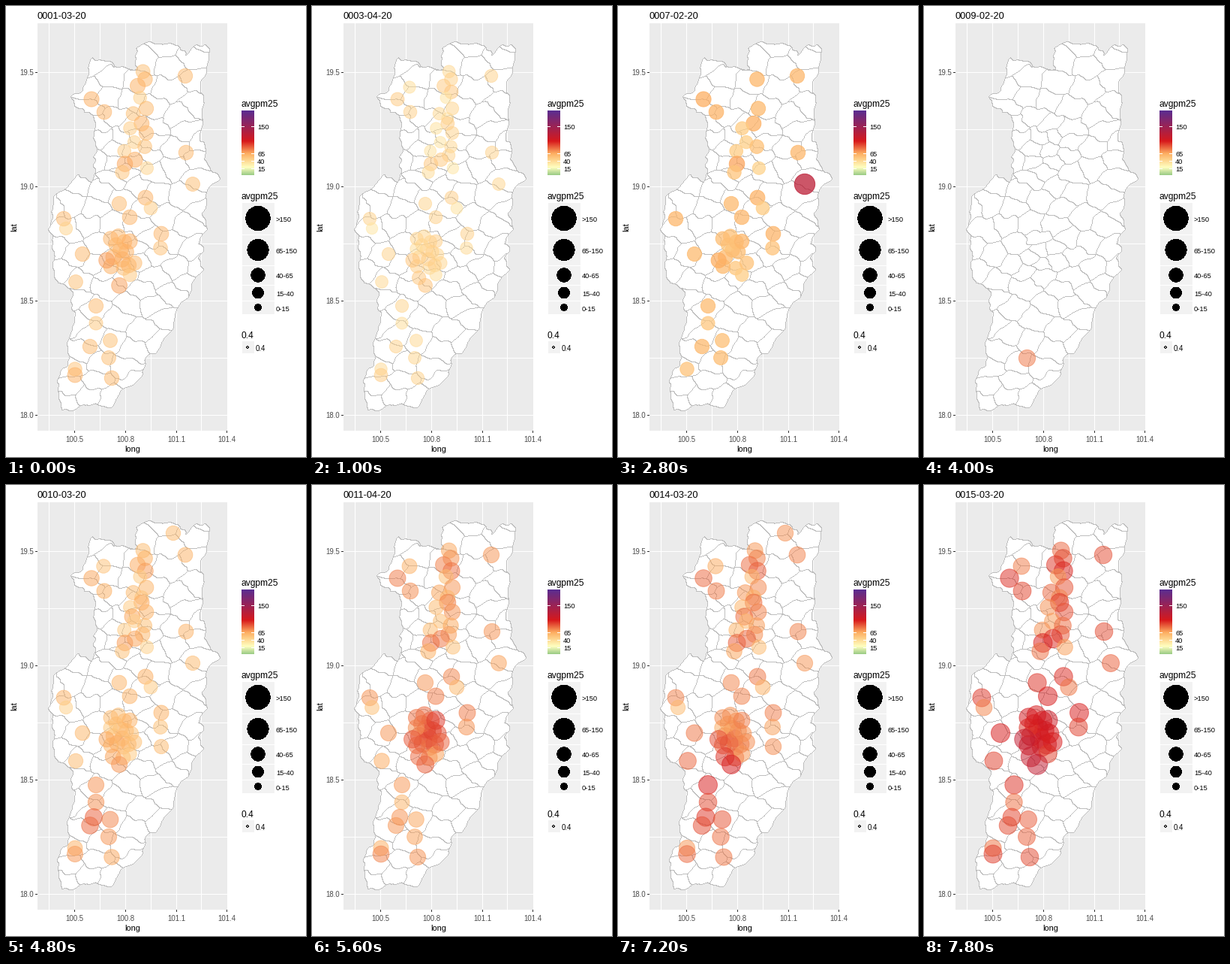
These frames come from a looping animation (400x600 px, 8 s). A matplotlib script:

```python
import numpy as np
import matplotlib.pyplot as plt
from matplotlib.animation import FuncAnimation
from matplotlib.colors import LinearSegmentedColormap, to_rgb
from matplotlib.path import Path

W, H, DPI = 400, 600, 100
PT = 72 / DPI  # points per pixel
FRAMES, STEP = 40, 200
LEFT, TOP, RIGHT, BOTTOM = 42, 23, 295, 565  # map panel
BORDER, GREY = "#bebebe", "#4d4d4d"

plt.rcParams["font.family"] = "Liberation Sans"
rng = np.random.default_rng(11)

# Province outline, clockwise from the north
OUTLINE = np.reshape(
    [183, 49, 205, 50, 231, 54, 240, 65, 249, 58, 264, 48, 271, 58, 268, 85,
     261, 102, 262, 125, 260, 150, 262, 178, 267, 203, 276, 218, 284, 230,
     270, 243, 264, 258, 269, 266, 262, 276, 268, 298, 257, 315, 263, 328,
     258, 338, 262, 350, 250, 368, 244, 388, 228, 405, 225, 422, 210, 447,
     197, 462, 187, 470, 181, 495, 168, 505, 155, 512, 140, 536, 110, 530,
     75, 540, 72, 518, 68, 500, 84, 470, 82, 449, 92, 425, 88, 395, 88, 380,
     71, 368, 61, 342, 66, 332, 62, 304, 55, 299, 62, 281, 60, 272, 66, 254,
     88, 236, 97, 226, 118, 238, 118, 205, 120, 185, 117, 142, 104, 142,
     88, 123, 107, 105, 115, 72, 137, 74, 146, 82, 172, 85, 177, 62, 173, 55],
    (-1, 2))

# Stations outside the two valleys; the first two are seen most often
REMOTE = np.reshape(
    [137, 468, 249, 237, 223, 64, 239, 93, 130, 108, 114, 124, 131, 141,
     240, 195, 151, 263, 186, 255, 193, 269, 165, 281, 77, 283, 80, 296,
     102, 330, 93, 367, 207, 303, 206, 322, 207, 348, 120, 399, 120, 422,
     117, 442, 139, 445, 112, 453, 92, 483, 92, 491, 141, 495], (-1, 2))

# Readings: day, mean, coverage, opacity, then hot spot x, y, width, gain
KEYS = {2: [(8, 56, 0.6, 0.75, 249, 237, 12, 1.25),
            (9, 80, 0.01, 0.52, 249, 237, 12, 0),
            (10, 56, 0.6, 0.75, 249, 237, 12, 1.25)],
        3: [(1, 56, 0.78, 0.52, 150, 330, 40, 0.12),
            (13, 59, 0.96, 0.52, 105, 475, 50, 0.5),
            (15, 85, 0.9, 0.52, 150, 335, 70, 0.3)],
        4: [(5, 43, 0.88, 0.52, 150, 345, 40, 0.08),
            (11, 68, 0.92, 0.52, 166, 325, 35, 0.4)]}
# February readings start on the fifth
DATES = [(day, month) for day in range(1, 16) for month in (2, 3, 4)
         if month > 2 or day >= 5][:FRAMES]

LOW, HIGH = -4, 203
STOPS = [(LOW, "#9dcc87"), (20, "#ffffc0"), (65, "#fdae61"),
         (105, "#d7191c"), (HIGH, "#5a2d91")]
CMAP = LinearSegmentedColormap.from_list(
    "haze", [((v - LOW) / (HIGH - LOW), c) for v, c in STOPS])


def colour(v):
    return CMAP((np.asarray(v) - LOW) / (HIGH - LOW))


def radius(v):
    return 1 + 1.13 * np.sqrt(v)


def bump(x, y, cx, cy, sx, sy):
    return np.exp(-((x - cx) / sx) ** 2 - ((y - cy) / sy) ** 2)


# ---- stations ----
def north_valley(n=21):
    """A winding strip that widens towards the south."""
    t = (np.arange(n) + 0.5) / n
    sway = (4 + 15 * t) * np.sin(2.4 * np.arange(n))
    return np.column_stack([183 - 14 * t + sway, 80 + 144 * t ** 0.8])


def mid_valley(n=22):
    """A sunflower spiral, taller than wide."""
    k = np.arange(n)
    r, a = np.sqrt((k + 0.5) / n), 2.4 * k
    return np.column_stack([152 + 20 * r * np.cos(a), 337 + 37 * r * np.sin(a)])


STATIONS = np.vstack([REMOTE, north_valley(), mid_valley()])
COUNT = len(STATIONS)
RANK = np.concatenate([[0, 1], 2 + rng.permutation(COUNT - 2)])
BIAS = np.clip(rng.normal(0, 0.11, COUNT), -0.35, 0.2)
BIAS[:2] = 0


def readings(day, month):
    """Indices, values and opacity of the stations seen on a date."""
    keys = np.array(KEYS[month])
    mean, _, _, cx, cy, width, gain = [np.interp(day, keys[:, 0], col)
                                       for col in keys[:, 1:].T]
    coverage, alpha = keys[np.argmin(abs(keys[:, 0] - day)), 2:4]
    shown = np.flatnonzero(RANK < coverage * COUNT)
    x, y = STATIONS[shown].T
    heat = gain * bump(x, y, cx, cy, width, width)
    return shown, mean * (1 + BIAS[shown] + heat), alpha


# ---- still picture, painted pixel by pixel ----
stage = np.ones((H, W, 3))
yy, xx = np.mgrid[:H, :W] + 0.5


def fill(x0, y0, x1, y1, c):
    stage[y0:y1, x0:x1] = to_rgb(c)


def key_box(x0, y0, x1, y1):
    fill(x0 + 1, y0 + 1, x1, y1, "#f2f2f2")


def disc(cx, cy, r, c):
    stage[np.hypot(xx - cx, yy - cy) < r] = to_rgb(c)


def ragged(x, y):
    """Shift coordinates by a sum of small random waves."""
    dx, dy = np.zeros_like(x), np.zeros_like(y)
    for _ in range(9):
        a, phase = rng.uniform(0, 2 * np.pi, 2)
        wave = rng.uniform(9, 32)
        s = 2 * np.pi / wave * (x * np.cos(a) + y * np.sin(a)) + phase
        dx += 0.035 * wave * np.sin(s)
        dy += 0.035 * wave * np.cos(s)
    return x + dx, y + dy


def district_seeds(land):
    """Throw darts that keep their distance, closer in the valleys."""
    seeds = []
    for x, y in rng.uniform((50, 45), (288, 542), (5000, 2)):
        gap = (28 - 13 * bump(x, y, 165, 195, 35, 60)
               - 14 * bump(x, y, 155, 335, 32, 35))
        if land.contains_point((x, y)) and all(
                np.hypot(x - u, 1.35 * (y - v)) > gap for u, v in seeds):
            seeds.append((x, y))
    return seeds


def paint_map():
    land = Path(OUTLINE)
    x, y = ragged(xx, yy)
    label = np.zeros((H, W), int)
    best = np.full((H, W), np.inf)
    for i, (u, v) in enumerate(district_seeds(land)):
        d = (x - u) ** 2 + (1.35 * (y - v)) ** 2
        label[d < best] = i
        best = np.minimum(best, d)
    inside = land.contains_points(
        np.column_stack([x.ravel(), y.ravel()])).reshape(H, W)
    label[~inside] = -1
    edge = np.zeros((H, W), bool)
    edge[:, :-1] |= label[:, :-1] != label[:, 1:]
    edge[:-1] |= label[:-1] != label[1:]
    stage[inside] = 1
    stage[edge] = to_rgb(BORDER)


fig = plt.figure(figsize=(W / DPI, H / DPI), dpi=DPI, facecolor="white")
ax = fig.add_axes([0, 0, 1, 1])
ax.axis("off")


def text(x, y, s, size, color="black", va="baseline", **kw):
    return ax.text(x, y, s, fontsize=size * PT, color=color, va=va, **kw)


# panel, grid and axes
MIDDLE = "center_baseline"
fill(LEFT, TOP, RIGHT, BOTTOM, "#ebebeb")
for k in range(7):
    x, y = int(57.5 + 33.9 * k), int(88 + 76.1 * k)
    fill(x, TOP, x + 1, BOTTOM, "white")
    fill(LEFT, y, RIGHT, y + 1, "white")
for k in range(4):
    x, y = int(91.4 + 67.8 * k), int(88 + 152.2 * k)
    fill(x, BOTTOM, x + 1, BOTTOM + 3, "#333333")
    fill(LEFT - 3, y, LEFT, y + 1, "#333333")
    text(x + 0.5, 576, f"{100.5 + 0.3 * k:.1f}", 9.6, GREY, MIDDLE, ha="center")
    text(37, y + 0.5, f"{19.5 - 0.5 * k:.1f}", 9.6, GREY, MIDDLE, ha="right")
text(169, 593, "long", 11, ha="center")
text(11.5, 294, "lat", 11, va="center", ha="center", rotation=90)
title = text(42, 17, "", 12.8)
paint_map()

# colour legend
text(313, 134, "avgpm25", 12)
stage[139:225, 314:331] = colour(np.linspace(HIGH, LOW, 86))[:, None, :3]
for v in (150, 65, 40, 15):
    y = int(223.2 - 0.415 * v)
    fill(314, y, 318, y + 1, "white")
    fill(327, y, 331, y + 1, "white")
    text(335, y + 0.5, str(v), 9.3, va=MIDDLE)

# size legend
text(313, 257, "avgpm25", 12)
top = 261
for label, v, height in [(">150", 200, 43), ("65-150", 150, 41),
                         ("40-65", 65, 26), ("15-40", 40, 21),
                         ("0-15", 15, 18)]:
    key_box(314, top, 358, top + height)
    y = top + height / 2
    disc(336, y, radius(v) - 0.3, "black")
    text(360, y + 1, label, 9.3, va=MIDDLE)
    top += height

# marker legend
text(313, 442, "0.4", 12)
key_box(314, 445, 331, 462)
disc(322, 454, 2.1, "black")
disc(322, 454, 1, "#888888")
text(333, 455, "0.4", 9.6, va=MIDDLE)

ax.imshow(stage, extent=(0, W, H, 0), aspect="auto", interpolation="nearest")
dots = ax.scatter([], [], linewidths=PT, zorder=3)
ax.set_xlim(0, W)
ax.set_ylim(H, 0)


def draw(i):
    day, month = DATES[i]
    title.set_text(f"{day:04d}-{month:02d}-20")
    shown, v, alpha = readings(day, month)
    rgba = colour(v)
    rgba[:, 3] = alpha
    dots.set_offsets(STATIONS[shown])
    dots.set_sizes((2 * radius(v) * PT) ** 2)
    dots.set_facecolors(rgba)
    dots.set_edgecolors(rgba)
    return title, dots


anim = FuncAnimation(fig, draw, frames=FRAMES, interval=STEP, repeat=True,
                     repeat_delay=0, blit=False)
plt.show()
```
